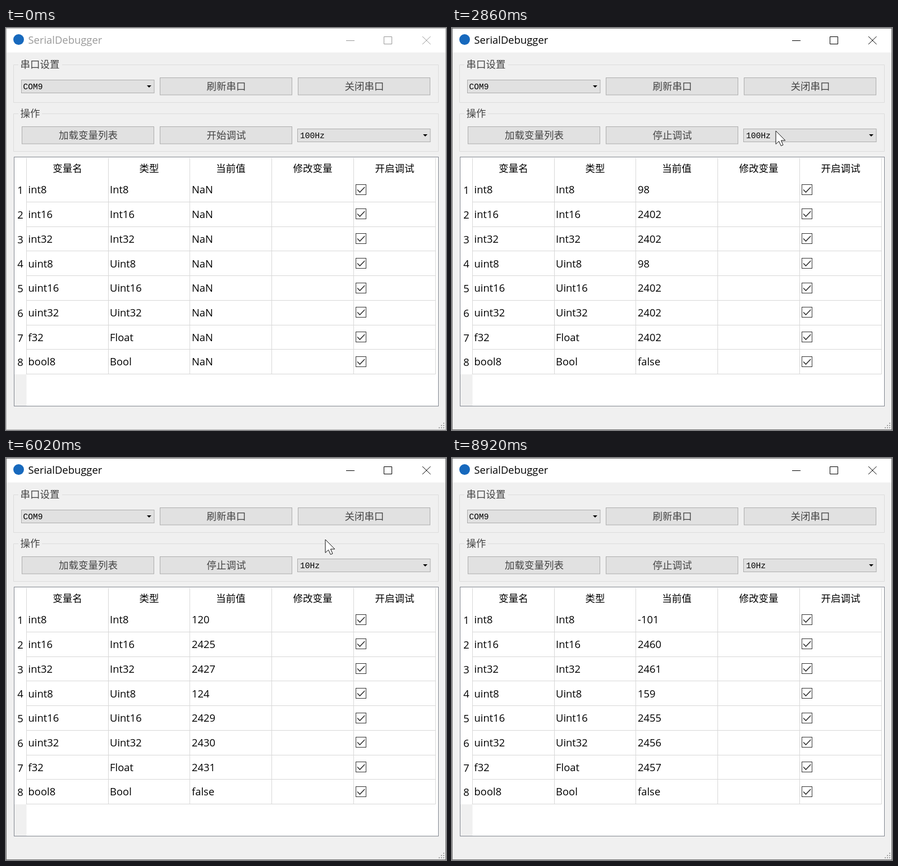
An HTML page that plays this animation: 784 px wide and 715 px high, repeating every 8.99 s.

```html
<!DOCTYPE html>
<html lang="zh-CN">
<head>
<meta charset="utf-8">
<title>SerialDebugger</title>
<style>
  html, body { margin: 0; width: 100%; height: 100%; overflow: hidden; background: #f0f0f0; }
  svg { display: block; width: 784px; height: 715px; }
  text { white-space: pre; }
  .ui { font: 18.4px "Open Sans", "Noto Sans", sans-serif; }
  .head { font: 17.5px "Noto Sans CJK SC", "Noto Sans CJK", sans-serif; }
  .song { font: 300 17.5px "Noto Sans CJK SC", "Noto Sans CJK", sans-serif; fill: #444; }
  .mono { font: 14.58px "Liberation Mono", monospace; }
  .mid { text-anchor: middle; }
  .line { fill: none; stroke: #d8d8d8; }
  .btn { fill: #e1e1e1; stroke: #adadad; }
  .box { fill: #fff; stroke: #333; }
  .tick { fill: none; stroke: #333; stroke-width: 1.6; }
  .chrome { fill: none; stroke: currentColor; }
</style>
</head>
<body>
<svg id="stage" viewBox="0 0 784 715" xmlns="http://www.w3.org/2000/svg"></svg>
<script>
const LOOP = 8990, TICK = 77.4, PITCH = 43.72, ITEM = 17.5;
const CLICK = 840, START = 990, OPEN = 3070, CLOSE = 4390;
const names = ['int8', 'int16', 'int32', 'uint8', 'uint16', 'uint32', 'f32', 'bool8'];
const types = ['Int8', 'Int16', 'Int32', 'Uint8', 'Uint16', 'Uint32', 'Float', 'Bool'];
const heads = ['变量名', '类型', '当前值', '修改变量', '开启调试'];
const rates = ['200Hz', '100Hz', '50Hz', '10Hz', '1Hz'];
const colX = i => Math.floor(36.4 + 145.75 * i) + 0.5;

// Markup helpers
const text = (cls, x, y, s, extra = '') => `<text class="${cls}" x="${x}" y="${y}" ${extra}>${s}</text>`;
const rect = (x, y, w, h, extra) => `<rect x="${x}" y="${y}" width="${w}" height="${h}" ${extra}/>`;
const path = (d, extra = '') => `<path d="${d}" ${extra}/>`;
const button = (x, y, label, id = '') =>
  rect(x, y, 235, 30.5, `class="btn" id="${id}"`) +
  text('song mid', x + 118, y + 21.3, label, `id="${id}Label"`);
const combo = (x, y, tx, label, id) =>
  rect(x, y, 236.5, 23, `class="btn" id="${id}"`) +
  text('mono', tx, y + 16.5, label, `id="${id}Label"`) +
  path(`M${x + 223.5} ${y + 9.5}h8l-4 4z`);
const group = (y, gap, label) =>
  path(`M22 ${y}H13.5v67H770.5v-67H${gap}`, 'fill="none" stroke="#dcdcdc"') +
  text('song', 25.5, y + 5.8, label);

function tableMarkup() {
  let out = rect(14.5, 229.5, 756, 443, 'fill="#fff" stroke="#828790"') +
    rect(15, 616, 21.5, 56, 'fill="#f0f0f0"');
  for (let i = 0; i < 6; i++) out += path(`M${colX(i)} 231V615.5`, 'class="line"');
  heads.forEach((h, i) => out += text('head mid', (colX(i) + colX(i + 1)) / 2, 256, h));
  names.forEach((name, i) => {
    const y = 294.4 + PITCH * i, top = Math.round(277.7 + PITCH * i) + 0.5;
    out += path(`M36 ${Math.round(309 + PITCH * i) + 0.5}H765.5`, 'class="line"') +
      text('ui mid', 25.5, y + 0.8, i + 1) +
      text('ui', 39.5, y, name) +
      text('ui', 185, y, types[i]) +
      text('ui', 331, y, 'NaN', `id="v${i}"`) +
      rect(623.5, top, 18, 18, 'class="box"') +
      path(`M626 ${top + 9}l4.5 4.5 8.7-9`, 'class="tick"');
  });
  return out;
}

function popupMarkup() {
  const items = rates.map((r, i) => text('mono', 524, 216.7 + ITEM * i, r, `id="r${i}"`));
  return '<g id="popup">' +
    rect(523, 205, 236, 88, 'fill="#000" opacity=".4"') +
    rect(520.5, 202.5, 236, 88, 'fill="#fff" stroke="#646464"') +
    '<g id="pick">' + rect(521, 0, 235, 17, 'fill="#0078d7"') +
    rect(521.5, 0.5, 234, 16, 'fill="none" stroke="#e08a3c" stroke-dasharray="1 1"') + '</g>' +
    items.join('') + '</g>';
}

function gripMarkup() {
  let out = '';
  for (let r = 0; r < 3; r++)
    for (let c = 2 - r; c < 3; c++) out += rect(771 + c * 4, 702 + r * 4, 2, 2, 'fill="#a4a4a4"');
  return out;
}

document.getElementById('stage').innerHTML =
  rect(0, 0, 784, 715, 'fill="#f0f0f0"') +
  rect(0, 0, 784, 43.5, 'fill="#fff"') +
  '<circle cx="22.5" cy="20.5" r="9.5" fill="#1769bd"/>' +
  '<g id="chrome">' + text('ui', 39.5, 28, 'SerialDebugger', 'fill="currentColor"') +
  path('M606 22.5h15M673.5 15.5h14v13h-14zM742 15l14.5 14M756.5 15l-14.5 14', 'class="chrome"') + '</g>' +
  group(65.5, 100, '串口设置') + group(152.5, 64, '操作') +
  combo(27.5, 92.5, 30.5, 'COM9', 'port') +
  button(274.5, 88.5, '刷新串口') + button(520.5, 88.5, '关闭串口') +
  button(28.5, 175.5, '加载变量列表') + button(274.5, 175.5, '开始调试', 'run') +
  combo(519.5, 179.5, 524, '100Hz', 'rate') +
  tableMarkup() + gripMarkup() +
  rect(0.5, 0.5, 783, 714, 'id="frame" fill="none"') +
  popupMarkup() +
  path('M0 0V23.5L5.5 18.4 9.3 26.6 13 25 9.4 17H16.8Z', 'id="cursor" fill="#fff" stroke="#111"');

const el = id => document.getElementById(id);
const linear = p => p;
const smooth = p => p * p * (3 - 2 * p);

// Blend between keys of the form [time, values]
function track(keys, t, ease) {
  const n = keys.findIndex(k => k[0] > t);
  if (n === 0) return keys[0][1];
  if (n < 0) return keys[keys.length - 1][1];
  const [t0, a] = keys[n - 1], [t1, b] = keys[n];
  const p = ease((t - t0) / (t1 - t0));
  return a.map((v, i) => v + (b[i] - v) * p);
}

// Places where the pointer rests or turns
const onRun = [363, 184.5], onItem = [563, 270], above = [569, 145];
const pointer = [
  [220, [462, 690]], [684, onRun], [1320, onRun], [2000, [500, 124]], [2690, [579, 138]],
  [2851, [577, 183]], [3780, onItem], [4330, onItem], [4728, above], [7410, above],
  [7495, [574, 172]], [8350, [592, 190]], [8579, [650, 664]]
];

// Fill and border of a control
const normal = [225, 225, 225, 173, 173, 173];
const hover = [229, 241, 251, 0, 120, 215];
const pressed = [204, 228, 247, 0, 84, 153];
const runLook = [[770, normal], [830, pressed], [1000, pressed], [1230, hover], [1470, hover], [1680, normal]];
const rateLook = [[2860, normal], [3060, pressed], [4480, pressed], [4760, normal],
  [7450, normal], [7900, hover], [8370, hover], [8570, normal]];

function paint(id, keys, t) {
  const c = track(keys, t, linear).map(Math.round), { style } = el(id);
  style.fill = `rgb(${c.slice(0, 3)})`;
  style.stroke = `rgb(${c.slice(3)})`;
}

// Fast polling reads every row at once, slow polling one row every 108 ms
function sample(row, t) {
  const newest = Math.floor((t - 5970) / 108);
  const read = newest - (newest - row & 7);
  if (read >= -14) return Math.floor(2433.6 + 1.09 * read);
  const lead = row === 2 || row === 3 ? 0.6 : 0;
  return Math.floor(2385 + (Math.min(t, 4400) - 1130) / 100 + lead);
}

function reading(row, t) {
  if (t < START) return 'NaN';
  const type = names[row], v = sample(row, t);
  if (type === 'bool8') return 'false';
  if (type === 'int8') return v << 24 >> 24;
  return type === 'uint8' ? v & 255 : v;
}

function setText(id, s) {
  const node = el(id);
  if (node.textContent !== String(s)) node.textContent = s;
}

function draw(time) {
  // The screen refreshes in coarse ticks
  const t = Math.floor((time + 12) / TICK) * TICK - 12;
  const active = time >= CLICK;
  el('chrome').style.color = active ? '#000' : '#999';
  el('frame').style.stroke = active ? '#6c6c6c' : '#b0b0b0';

  const [x, y] = track(pointer, t, smooth);
  el('cursor').setAttribute('transform', `translate(${x} ${y})`);
  el('cursor').style.display = t > 215 && t < 8650 ? '' : 'none';
  paint('run', runLook, t);
  paint('rate', rateLook, t);
  setText('runLabel', t < START ? '开始调试' : '停止调试');
  setText('rateLabel', t < CLOSE ? '100Hz' : '10Hz');

  el('popup').style.display = t >= OPEN && t < CLOSE ? '' : 'none';
  const pick = y < 203 ? 1 : Math.min(4, Math.floor((y - 203) / ITEM));
  el('pick').setAttribute('transform', `translate(0 ${Math.round(202.4 + ITEM * pick)})`);
  rates.forEach((r, i) => el('r' + i).style.fill = i === pick ? '#fff' : '#000');
  names.forEach((n, i) => setText('v' + i, reading(i, t)));
}

const begin = performance.now();
function loop() {
  draw((performance.now() - begin) % LOOP);
  requestAnimationFrame(loop);
}
loop();
</script>
</body>
</html>
```
